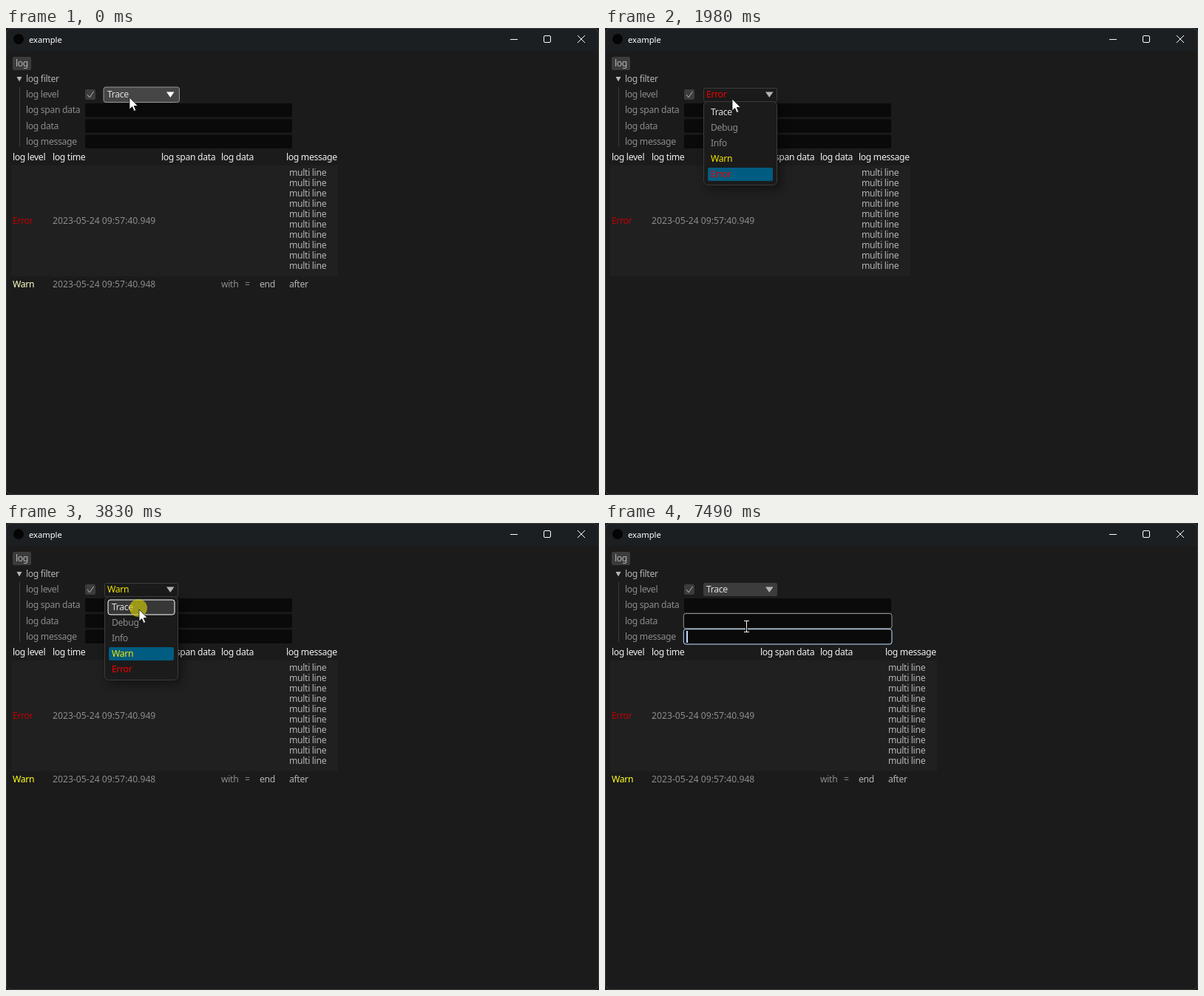
An HTML page with a canvas for the animation above (8 s loop, 802 by 632 pixels).

```html
<!DOCTYPE html>
<html lang="en">
<head>
<meta charset="utf-8">
<title>example</title>
<style>
  html, body { margin: 0; width: 100%; height: 100%; overflow: hidden; background: #1b1b1b; }
  canvas { display: block; }
</style>
</head>
<body>
<canvas id="stage" width="802" height="632"></canvas>
<script>
const ctx = document.getElementById('stage').getContext('2d');
const LOOP = 8000, TRAVEL = 350, HOLD = 120, LAG = 60;
const DIM = '#8c8c8c', TEXT = '#b4b4b4', BRIGHT = '#f0f0f0';
const FILL = '#3c3c3c', BODY = '#1b1b1b', HOVER = '#969696', FOCUS = '#c0deff';
const LEVELS = [['Trace', '#e0e0e0'], ['Debug', DIM], ['Info', DIM], ['Warn', '#f5e600'], ['Error', '#f00000']];
const ERROR = 4, DATA = 1, MESSAGE = 2;

const fieldY = i => 102 + 21.2 * i;
const itemY = i => 114 + 21 * i;

// Each step: when the pointer sets off, where to, when it presses and what that does
const STEPS = [
  { go: 0, x: 166, y: 93, press: 150, opens: true },
  { go: 330, x: 180, y: itemY(ERROR) + 2, press: 880, pick: ERROR },
  { go: 950, x: 172, y: 133 },
  { go: 1500, x: 171, y: 95, press: 1780, opens: true },
  { go: 1980, x: 174, y: itemY(0) + 2 },
  { go: 2320, x: 186, y: itemY(3) + 2, press: 2610, pick: 3 },
  { go: 2760, x: 181, y: 91, press: 3225, opens: true },
  { go: 3405, x: 179, y: itemY(0) + 2, press: 3760, pick: 0 },
  { go: 3830, x: 191, y: 140, press: 4500, focus: DATA }
];
const WORD = 'end', TYPE = [5560, 5830, 5960], ERASE = [6500, 6630, 6830], TAB = 7490;

const passed = (times, t) => times.filter(at => at <= t).length;
const pressedAt = t => STEPS.some(s => t >= s.press && t < s.press + HOLD);

function pointerAt(t) {
  let { x, y } = STEPS[0];
  for (const s of STEPS) {
    if (s.go > t) break;
    const k = 1 - (1 - Math.min(1, (t - s.go) / TRAVEL)) ** 3;
    x += (s.x - x) * k;
    y += (s.y - y) * k;
  }
  return [x, y];
}

function hoverAt([x, y], open) {
  if (open) return x > 133 && y > 103.5 && y < 208.5 ? 'item' + Math.floor((y - 103.5) / 21) : null;
  if (y > 80 && y < 101) return 'combo';
  const i = Math.floor((y - 101) / 21.2);
  return i >= 0 && i < 3 ? i : null;
}

function stateAt(t) {
  const s = { level: 0, open: false, focus: null, picked: false };
  for (const step of STEPS) {
    if (step.focus !== undefined && t >= step.press + LAG) s.focus = step.focus;
    if (!(t >= step.press + HOLD + LAG)) continue;
    s.open = !!step.opens;
    if (step.pick !== undefined) {
      s.level = step.pick;
      s.picked = true;
    }
  }
  if (t >= TAB) s.focus = MESSAGE;
  s.typed = WORD.slice(0, passed(TYPE, t) - passed(ERASE, t));
  s.pointer = pointerAt(t);
  s.down = pressedAt(t);
  s.active = pressedAt(t - LAG);
  s.hover = hoverAt(pointerAt(Math.max(0, t - LAG)), s.open);
  return s;
}

function text(str, x, mid, color = TEXT) {
  ctx.font = '300 12.2px "Noto Sans", sans-serif';
  ctx.letterSpacing = /^\d/.test(str) ? '0px' : '-0.33px';
  ctx.fillStyle = color;
  ctx.fillText(str, x, mid + 4);
}

function box(x, y, w, h, fill, stroke, r = 2) {
  ctx.beginPath();
  ctx.roundRect(x, y, w, h, r);
  ctx.lineWidth = 1;
  if (fill) { ctx.fillStyle = fill; ctx.fill(); }
  if (stroke) { ctx.strokeStyle = stroke; ctx.stroke(); }
}

function dot(x, y, r, fill) {
  ctx.beginPath();
  ctx.arc(x, y, r, 0, 7);
  ctx.fillStyle = fill;
  ctx.fill();
}

function poly(points, fill) {
  ctx.beginPath();
  points.forEach(([x, y]) => ctx.lineTo(x, y));
  ctx.closePath();
  ctx.fillStyle = fill;
  ctx.fill();
}

const triangle = (x, y, w, h, fill) => poly([[x, y], [x + w, y], [x + w / 2, y + h]], fill);

function lines(color, width, ...paths) {
  ctx.beginPath();
  for (const p of paths) p.forEach(([x, y], i) => i ? ctx.lineTo(x, y) : ctx.moveTo(x, y));
  ctx.strokeStyle = color;
  ctx.lineWidth = width;
  ctx.stroke();
}

function drawWindow() {
  ctx.fillStyle = BODY;
  ctx.fillRect(0, 0, 802, 632);
  ctx.fillStyle = '#1c1f22';
  ctx.fillRect(0, 0, 802, 31);
  box(0.5, 0.5, 801, 631, null, '#3d3d3d', 7);
  dot(17, 15, 7, '#050505');
  ctx.font = '11.2px "Noto Sans", sans-serif';
  ctx.letterSpacing = '0px';
  ctx.fillStyle = '#fff';
  ctx.fillText('example', 31, 20);
  lines('#fff', 1, [[682, 15.5], [692, 15.5]]);
  box(727.5, 10.5, 9, 9, null, '#fff', 1.5);
  lines('#fff', 1, [[773, 10], [783, 20]], [[783, 10], [773, 20]]);
}

function drawFilter(s) {
  box(9, 39, 25, 18, FILL);
  text('log', 13, 48);
  triangle(14.5, 66, 7, 6.5, TEXT);
  text('log filter', 27, 69);
  lines(FILL, 1, [[18.5, 80], [18.5, 161]]);
  ['log level', 'log span data', 'log data', 'log message']
    .forEach((label, i) => text(label, 27, Math.round(90 + 21.3 * i), DIM));

  box(107, 83, 14, 14, FILL);
  lines(TEXT, 1, [[110, 90], [113, 94], [118.5, 86]]);
  drawCombo(s);

  for (let i = 0; i < 3; i++) {
    const y = fieldY(i);
    box(107, y, 280, 18.5, '#0a0a0a');
    const edge = s.focus === i ? FOCUS : s.hover === i ? HOVER : null;
    if (edge) box(106.3, y - 0.7, 281.7, 20.3, null, edge, 3);
  }
  text(s.typed, 111, 133);
  if (s.focus !== null) {
    const typed = s.focus === DATA ? s.typed : '';
    ctx.fillStyle = FOCUS;
    ctx.fillRect(110 + ctx.measureText(typed).width, Math.round(fieldY(s.focus)) + 2, 2, 16);
  }
}

function drawCombo(s) {
  const over = s.hover === 'combo';
  if (s.open) box(133.5, 81.5, 99, 18, BODY, FILL);
  else if (over) box(132, 80, 102.5, 20.5, s.active ? '#373737' : '#464646', s.active ? '#fff' : HOVER, 3);
  else box(133, 81, 100, 18, FILL);
  const [name, color] = LEVELS[s.level];
  text(name, 137, 90, s.level === ERROR && !s.open && !over ? '#800000' : color);
  triangle(217, 86.5, 10.5, 7.5, over ? '#fff' : TEXT);
}

function drawTable(s) {
  const warn = s.level < ERROR, error = !s.typed;
  const message = warn ? 379 : 343;
  ctx.fillStyle = '#202020';
  ctx.fillRect(7, 186, message + 63, error ? 150 : 21);
  const columns = { 'log level': 9, 'log time': 63, 'log span data': 210, 'log data': 291, 'log message': message };
  for (const label in columns) text(label, columns[label], 175, BRIGHT);
  if (error) {
    text('Error', 9, 261, '#c00000');
    text('2023-05-24 09:57:40.949', 63, 261, DIM);
    for (let i = 0; i < 10; i++) text('multi line', message + 4, 196 + 14 * i);
  }
  if (warn) {
    const y = error ? 347 : 197;
    text('Warn', 9, y, s.picked ? '#ffff20' : '#ffffc4');
    text('2023-05-24 09:57:40.948', 63, y, DIM);
    text('with', 291, y, DIM);
    text('=', 323, y, DIM);
    text('end', 343, y);
    text('after', 383, y);
  }
}

function drawPopup(s) {
  ctx.save();
  ctx.shadowColor = 'rgba(0,0,0,0.42)';
  ctx.shadowBlur = 14;
  ctx.shadowOffsetX = ctx.shadowOffsetY = 5;
  box(133, 99, 100, 114, BODY, null, 6);
  ctx.restore();
  box(133.5, 99.5, 99, 113, BODY, FILL, 6);
  LEVELS.forEach(([name, color], i) => {
    const y = itemY(i), over = s.hover === 'item' + i, chosen = i === s.level;
    if (chosen) box(139, y - 9, 88, 18, '#005c80');
    if (over) box(138, y - 10, 90, 20, chosen ? null : '#373737', s.active ? '#fff' : HOVER, 3);
    text(name, 143, y, over && color === DIM ? BRIGHT : color);
  });
}

function drawPointer(s) {
  const [x, y] = s.pointer.map(Math.round);
  if (s.down) dot(x, y - 1, 12, 'rgba(205,200,10,0.68)');
  if (typeof s.hover === 'number') {
    const bar = dy => [[x - 3, y + dy], [x + 4, y + dy]];
    const beam = [bar(-7.5), [[x + 0.5, y - 7.5], [x + 0.5, y + 7.5]], bar(7.5)];
    lines('#000', 3, ...beam);
    lines('#fff', 1, ...beam);
    return;
  }
  const arrow = [[0, 0], [0, 16], [3.7, 12.6], [6.2, 18.4], [8.7, 17.3], [6.2, 11.6], [11.2, 11.4]]
    .map(([dx, dy]) => [x + 1 + dx, y + 1 + dy]);
  poly(arrow, '#fff');
  lines('#111', 0.8, [...arrow, arrow[0]]);
}

function draw(t) {
  const state = stateAt(t);
  drawWindow();
  drawFilter(state);
  drawTable(state);
  if (state.open) drawPopup(state);
  drawPointer(state);
}

function tick(now) {
  draw(now % LOOP);
  requestAnimationFrame(tick);
}
draw(0);
requestAnimationFrame(tick);
</script>
</body>
</html>
```
